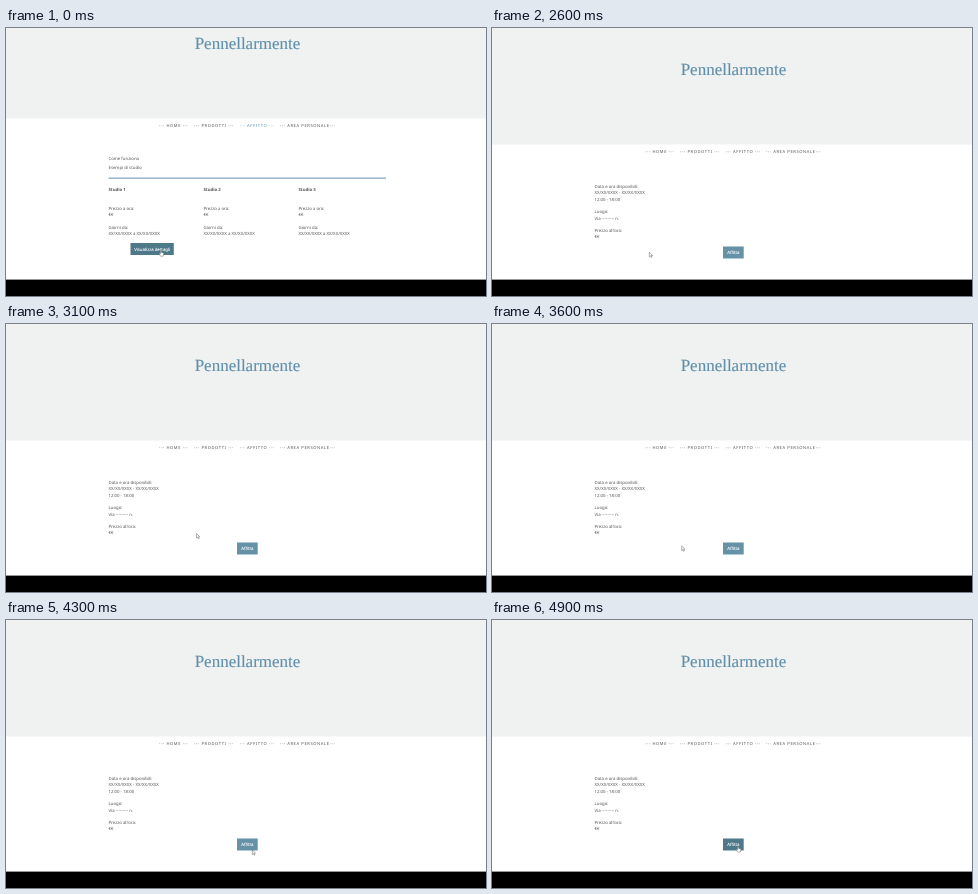
An HTML page for the animation above (8100 ms loop, 480 px wide and 268 px high).

```html
<!DOCTYPE html>
<html lang="it">
<head>
<meta charset="utf-8">
<title>Affitto studio</title>
<style>
  html, body { margin: 0; width: 100%; height: 100%; overflow: hidden; background: #fff; }
  svg { display: block; width: 100%; height: 100%; }
  text { font: 4.3px "Noto Sans", "Open Sans", sans-serif; fill: #555; white-space: pre; text-rendering: geometricPrecision; }
  .title { font: 17px "Liberation Serif", serif; fill: #6090aa; stroke: #6090aa; stroke-width: .15; text-anchor: middle; }
  .nav { font-size: 4.1px; letter-spacing: .6px; }
  .active { fill: #5f92ad; }
  .bold { font-weight: bold; }
  .label { fill: #fff; stroke: #fff; stroke-width: .1; text-anchor: middle; }
  .pointer { fill: #fff; stroke: #555; stroke-width: .45; stroke-linejoin: round; }
</style>
</head>
<body>
<svg viewBox="0 0 480 268" preserveAspectRatio="none">
  <g id="list"></g>
  <g id="detail"></g>
  <rect y="251.6" width="480" height="16.4"/>
  <path id="arrow" class="pointer" d="M0 0V4.6L1.1 3.6L1.9 5.3L2.7 4.9L1.9 3.3H3.3Z"/>
  <path id="hand" class="pointer" d="M-.9 -3Q-.4 -3.6 .1 -3V-.9L1.9 -.5Q2.5 -.2 2.4 .6L1.9 2.9H-.8L-2.2 .5Q-2 -.4 -.9 .5Z"/>
</svg>
<script>
const LOOP = 8100, STEP = 100;
const OPEN_DETAIL = 1800, LEAVE_BUTTON = 2600, HOVER_RENT = 4400;
const BLUE = '#6592a7', DARK_BLUE = '#4e7989';
const byId = id => document.getElementById(id);
const list = byId('list'), detail = byId('detail');
const arrow = byId('arrow'), hand = byId('hand');

function add(parent, tag, attrs, content = '') {
  const node = document.createElementNS('http://www.w3.org/2000/svg', tag);
  for (const key in attrs) node.setAttribute(key, attrs[key]);
  node.textContent = content;
  parent.append(node);
  return node;
}

const write = (parent, x, y, content, cls = '') =>
  add(parent, 'text', { x, y, class: cls }, content);

function header(page, bottom, active) {
  add(page, 'rect', { width: 480, height: bottom, fill: '#f0f2f1' });
  write(page, 241.5, bottom - 69.5, 'Pennellarmente', 'title');
  [[153, '--- HOME ---'], [188, '--- PRODOTTI ---'],
   [233.7, '--- AFFITTO ---'], [273.8, '--- AREA PERSONALE---']]
    .forEach(([x, item], i) =>
      write(page, x, bottom + 8.7, item, i === active ? 'nav active' : 'nav'));
}

function button(page, x, y, width, content, fill) {
  const box = add(page, 'rect', { x, y, width, height: 12, fill });
  write(page, x + width / 2, y + 7.5, content, 'label');
  return box;
}

header(list, 90.5, 2);
write(list, 102.5, 131.6, 'Come funziona');
write(list, 102.5, 140.6, 'Esempi di studio');
add(list, 'rect', { x: 102.5, y: 149.6, width: 277.5, height: 1, fill: '#6592ad' });
[102.5, 197.5, 292.5].forEach((x, i) => {
  write(list, x, 163.2, `Studio ${i + 1}`, 'bold');
  write(list, x, 182, 'Prezzo a ora:');
  write(list, x, 188, '€€');
  write(list, x, 200.7, 'Giorni da:');
  write(list, x, 207, 'XX/XX/XXXX a XX/XX/XXXX');
});
button(list, 124.5, 215, 43.3, 'Visualizza dettagli', DARK_BLUE);

header(detail, 116.5);
['Data e ora disponibili:', 'XX/XX/XXXX - XX/XX/XXXX', '12:00 - 18:00', '',
 'Luogo:', 'Via --------- n.', '', "Prezzo all'ora:", '€€']
  .forEach((line, i) => write(detail, 102.5, 160.2 + i * 6.27, line));
const rent = button(detail, 231, 218.5, 20.7, 'Affitta', BLUE);

// Pointer positions: time, x, y
const path = [
  [0, 155.3, 225.3], [2500, 155.3, 225.3], [2600, 157.3, 224.2],
  [2800, 172, 219], [3000, 187.5, 211], [3100, 190.5, 209.5],
  [3300, 190.5, 209.5], [3600, 189.7, 222], [3700, 191.5, 226],
  [4000, 224, 233.5], [4200, 245, 234.3], [4300, 246.3, 230],
  [4400, 246.8, 229], [4800, 246.8, 229], [4900, 246.5, 229.2], [LOOP, 246.5, 229.2]
];

function pointerAt(time) {
  const i = path.findIndex(point => point[0] > time);
  const [t0, x0, y0] = path[i - 1], [t1, x1, y1] = path[i];
  const k = (time - t0) / (t1 - t0);
  return [x0 + (x1 - x0) * k, y0 + (y1 - y0) * k];
}

const show = (node, visible) => node.setAttribute('visibility', visible ? 'visible' : 'hidden');

function draw(now) {
  const time = Math.floor(now % LOOP / STEP) * STEP;
  const overButton = time < LEAVE_BUTTON || time >= HOVER_RENT;
  show(list, time < OPEN_DETAIL);
  show(detail, time >= OPEN_DETAIL);
  show(hand, overButton);
  show(arrow, !overButton);
  rent.setAttribute('fill', time >= HOVER_RENT ? DARK_BLUE : BLUE);
  (overButton ? hand : arrow).setAttribute('transform', `translate(${pointerAt(time)})`);
}

const start = performance.now();
function tick() {
  draw(performance.now() - start);
  requestAnimationFrame(tick);
}
tick();
</script>
</body>
</html>
```
